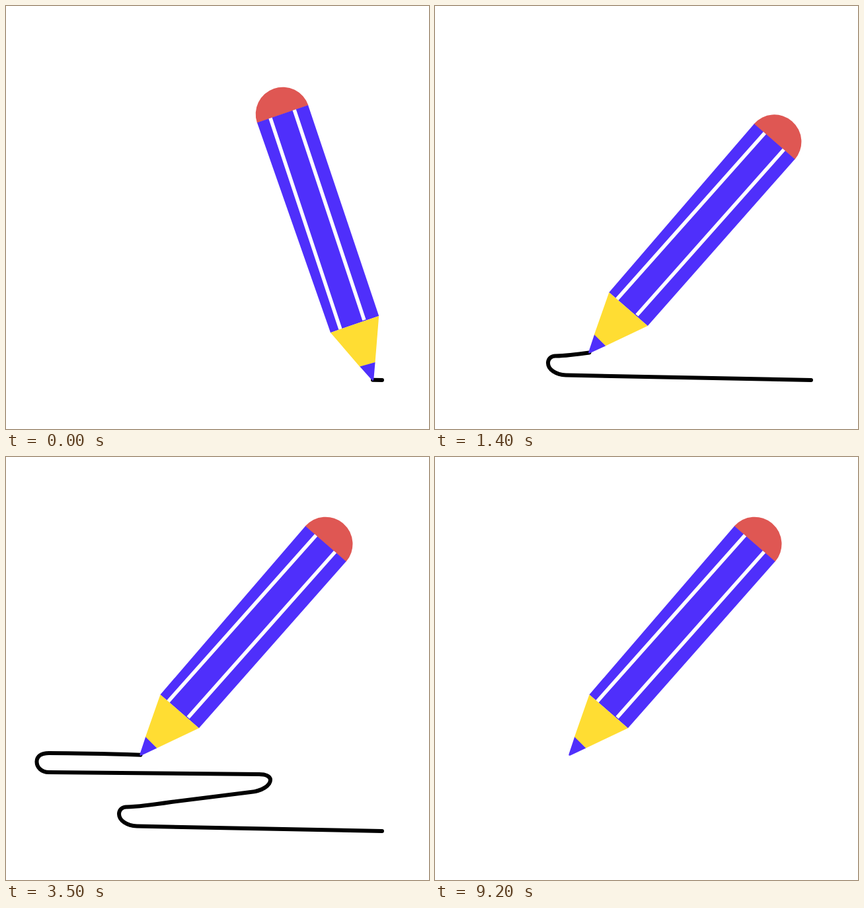
Write an HTML page that moves like this. It is 640 px wide and 640 px high and loops after 9.6 s.

```html
<!DOCTYPE html>
<html lang="en">
<head>
<meta charset="utf-8">
<title>Writing pencil</title>
<style>
  html, body { margin: 0; width: 100%; height: 100%; overflow: hidden; background: #fff; }
  svg { display: block; width: 100%; height: 100%; }
</style>
</head>
<body>
<svg viewBox="0 0 640 640">
  <g fill="#cdddf9">
    <g id="leftBubble">
      <rect x="104" y="83.5" width="302" height="194.5" rx="30"/>
      <path d="M142 277 L154 315 Q155 318 157.500 318 Q160 318 161 315 L176.500 277Z"/>
    </g>
    <g id="rightBubble">
      <rect x="318" y="300" width="196" height="82.500" rx="16"/>
      <path d="M457.500 382 L465.500 413 Q467.300 416 468.500 413 L475.500 382Z"/>
    </g>
  </g>
  <path id="line" fill="none" stroke="#000" stroke-width="6" stroke-linecap="round" stroke-linejoin="round"
    d="M569 566 L198 558.500 C183 558 171 550 171 540 C171 534 176 529 183 529.500
       C200 529 220 526.500 250 522 L370 507 C387 505.500 400 497 400 488.500
       C400 483 393 480 383 480 C300 479 200 478 65 477 C53 477 46.500 469 46.500 461
       C46.500 453 53 448 65 448 C105 448 150 449 203.500 450.700"/>
  <g id="pencil">
    <path fill="#df5753" d="M-39 -424.500 A41 41 0 0 1 43 -424.500Z"/>
    <path fill="#4f2ffb" d="M-38.800 -425 H42.800 L40.200 -88.500 H-37.200Z"/>
    <path stroke="#fff" stroke-width="5.500" d="M-17.600 -425 L-21.400 -88.500 M20.700 -425 L17.200 -90"/>
    <path fill="#ffdd33" d="M-37.200 -88.500 H40.200 L12 -24 L-12 -25Z"/>
    <path fill="#4f2ffb" d="M-12 -25.500 L-1.800 -1 Q0 3.500 1.800 -1 L12 -24Z"/>
  </g>
</svg>
<script>
const FRAME = 100, FRAMES = 96;
const [leftBubble, rightBubble, line, pencil] =
  ['leftBubble', 'rightBubble', 'line', 'pencil'].map(id => document.getElementById(id));
const total = line.getTotalLength();

// Distance along the line of the point closest to (x, y).
function distanceAt(x, y) {
  let best = 0, nearest = Infinity;
  for (let d = 0; d <= total; d += 0.5) {
    const p = line.getPointAtLength(d);
    const gap = Math.hypot(p.x - x, p.y - y);
    if (gap < nearest) { nearest = gap; best = d; }
  }
  return best;
}

// Linear interpolation through [frame, value] keys, held at both ends.
function track(keys, f) {
  const next = keys.findIndex(key => key[0] > f);
  if (next < 0) return keys[keys.length - 1][1];
  if (next === 0) return keys[0][1];
  const [f0, v0] = keys[next - 1], [f1, v1] = keys[next];
  return v0 + (v1 - v0) * (f - f0) / (f1 - f0);
}

const easeInOut = u => u < 0.5 ? 4 * u ** 3 : 1 - 4 * (1 - u) ** 3;

const travel = [
  [0, distanceAt(555, 566)],
  [9, distanceAt(262.4, 560)],
  [20, distanceAt(376.8, 480)],
  [27, distanceAt(150.4, 478)],
  [30, distanceAt(50, 471)],
  [35, total]
];
const lean = [[0, -19], [11, -19], [14, 41], [18, 41], [20, -19], [29, -19], [32, 41]];
const leftSize = [[36, 0], [40, 1.047], [43, 1], [79, 1], [81, 0]];
const rightSize = [[39, 0], [43, 1.047], [46, 1], [80, 1], [82, 0]];
const retract = [[80, 0], [92, 1]];

function scaleAbout(node, x, y, s) {
  node.setAttribute('transform', `translate(${x} ${y}) scale(${s}) translate(${-x} ${-y})`);
}

function draw(time) {
  const f = Math.floor(time / FRAME) % FRAMES;
  const reach = track(travel, f);
  const tip = line.getPointAtLength(reach);
  const drawn = reach * (1 - easeInOut(track(retract, f)));

  pencil.setAttribute('transform', `translate(${tip.x} ${tip.y}) rotate(${track(lean, f)})`);
  line.setAttribute('stroke-dasharray', `${drawn} ${total + 10}`);
  line.setAttribute('visibility', drawn > 0 ? 'visible' : 'hidden');
  scaleAbout(leftBubble, 106, 319.5, track(leftSize, f));
  scaleAbout(rightBubble, 514, 415, track(rightSize, f));
}

let start;
function tick(now) {
  start ??= now;
  draw(now - start);
  requestAnimationFrame(tick);
}
draw(0);
requestAnimationFrame(tick);
</script>
</body>
</html>
```
